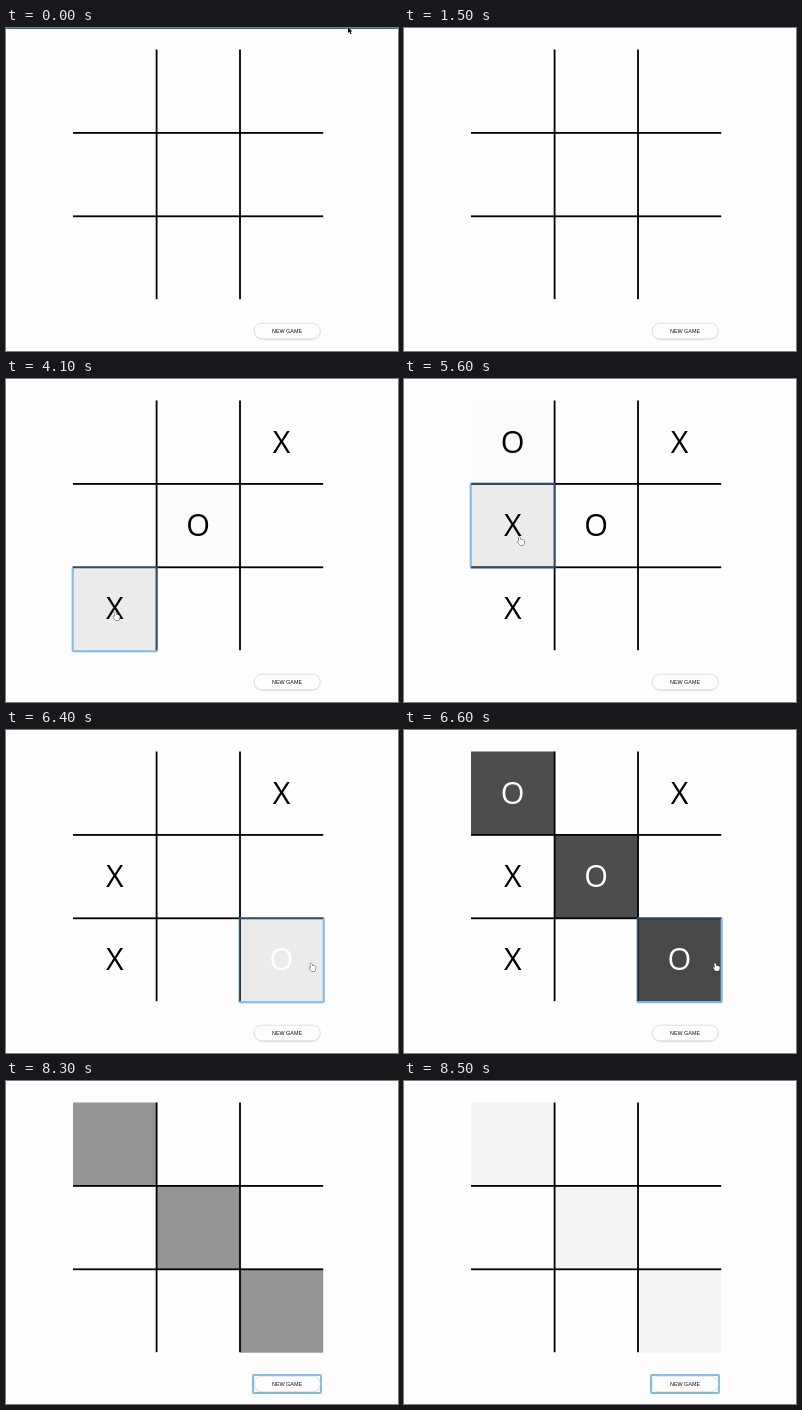
An HTML page with a canvas for the animation above (8.8 s loop, 392 by 323 pixels).

```html
<!DOCTYPE html>
<html lang="en">
<head>
<meta charset="utf-8">
<title>Tic-tac-toe</title>
<style>
html, body { margin: 0; overflow: hidden; background: #fefdff; }
canvas { display: block; }
</style>
</head>
<body>
<canvas id="stage" width="392" height="323"></canvas>
<script>
const ctx = document.getElementById('stage').getContext('2d');
const LOOP = 8800, WIN = 6400, PRESS = 7800, RESET = 8140;
const PAPER = [254, 253, 255], HOVER = [235, 235, 236];
const LEFT = 67, TOP = 21.5, CELL = 83.4;

// cell index, mark, pointer enters, click, pointer leaves
const turns = [
  [2, 'X', 2450, 2500, 3000],
  [4, 'O', 3050, 3300, 3750],
  [6, 'X', 3850, 4000, 4350],
  [0, 'O', 4550, 4600, 5250],
  [3, 'X', 5280, 5500, 6000],
  [8, 'O', 6250, WIN, 7200]
];
const winners = [0, 4, 8];

// time, x, y of the pointer's tip
const path = [
  [0, 342, -1], [100, 342, 2], [200, 342, 2], [500, 342, 15], [800, 342, 15],
  [1200, 342, 38], [1500, 342, -12], [1800, 300, -12], [2300, 290, 46],
  [2400, 290, 46], [2600, 282, 66], [2700, 282, 66], [3300, 195, 151],
  [3600, 195, 151], [4050, 109, 233], [4200, 109, 233], [4600, 110, 76],
  [5000, 110, 76], [5500, 115.5, 158], [5800, 115.5, 158], [6400, 305, 233],
  [6600, 311, 233], [6700, 311, 233], [7600, 295.5, 297], [LOOP, 295.5, 297]
];

const clamp = v => Math.max(0, Math.min(1, v));
const easeOut = v => 1 - (1 - clamp(v)) ** 2;
const mix = (a, b, k) => a.map((v, i) => v + (b[i] - v) * k);
const rgb = c => `rgb(${c.map(Math.round).join()})`;
const corner = i => [LEFT + CELL * (i % 3), TOP + CELL * Math.floor(i / 3)];

function pointerAt(t) {
  const n = path.findIndex(p => p[0] > t);
  const a = path[n - 1], b = path[n];
  const k = (t - a[0]) / (b[0] - a[0]);
  const s = k * k * (3 - 2 * k);
  return [a[1] + (b[1] - a[1]) * s, a[2] + (b[2] - a[2]) * s];
}

function text(str, x, y, font, color) {
  ctx.font = font;
  ctx.fillStyle = color;
  ctx.textAlign = 'center';
  ctx.fillText(str, x, y);
}

function ring(x, y, w, h) {
  ctx.strokeStyle = '#84bce8';
  ctx.lineWidth = 2;
  ctx.beginPath();
  ctx.roundRect(x, y, w, h, 1);
  ctx.stroke();
}

function cellColor(i, t) {
  const [, , enter, , leave] = turns.find(turn => turn[0] === i);
  const over = easeOut((t - enter) / 200) * (1 - easeOut((t - leave) / 500));
  let color = mix(PAPER, HOVER, over);
  if (winners.includes(i)) {
    color = mix(color, [0, 0, 0], easeOut((t - WIN) / 450));
    color = mix(color, PAPER, easeOut((Math.min(t, 8500) - RESET) / 450));
  }
  return rgb(color);
}

function drawBoard(t) {
  for (const [i] of turns) {
    ctx.fillStyle = cellColor(i, t);
    ctx.fillRect(...corner(i), CELL, CELL);
  }
  const active = turns.filter(turn => turn[3] <= t).pop();
  const focused = active && t < PRESS;
  if (focused) {
    const [x, y] = corner(active[0]);
    ring(x - .3, y - .3, CELL + .8, CELL + .8);
  }
  ctx.fillStyle = '#000';
  for (const k of [1, 2]) {
    ctx.fillRect(LEFT + CELL * k - .7, TOP, 1.8, CELL * 3 - .5);
    ctx.fillRect(LEFT, TOP + CELL * k - .9, CELL * 3, 1.8);
  }
  if (focused) {
    const [x, y] = corner(active[0]);
    ctx.globalAlpha = .4;
    ring(x - .3, y - .3, CELL + .8, CELL + .8);
    ctx.globalAlpha = 1;
  }
  if (t >= RESET) return;
  for (const [i, mark, , click] of turns) {
    if (t < click) continue;
    const [x, y] = corner(i);
    const light = t >= WIN && winners.includes(i);
    text(mark, x + CELL / 2, y + 52, '30.5px "Open Sans", sans-serif', light ? '#fff' : '#000');
  }
}

function drawButton(t) {
  if (t >= PRESS) ring(247, 294, 68, 18);
  ctx.save();
  ctx.shadowColor = 'rgba(0,0,0,.2)';
  ctx.shadowBlur = 1.5;
  ctx.shadowOffsetY = .6;
  ctx.fillStyle = '#fefdff';
  ctx.strokeStyle = '#d8d8da';
  ctx.lineWidth = .8;
  ctx.beginPath();
  ctx.roundRect(248.2, 295.2, 66, 15.6, 7.8);
  ctx.fill();
  ctx.restore();
  ctx.strokeStyle = '#dddde0';
  ctx.lineWidth = .8;
  ctx.stroke();
  text('NEW GAME', 281, 305, '5.4px "Liberation Sans", Arial, sans-serif', '#111');
}

function drawPointer(t) {
  if (t >= RESET) return;
  const [x, y] = pointerAt(t);
  const hand = t >= 2450 && !(y > 272 && y < 294);
  ctx.save();
  ctx.translate(x, y);
  ctx.lineJoin = 'round';
  ctx.lineWidth = .8;
  ctx.fillStyle = hand ? '#fff' : '#000';
  ctx.strokeStyle = hand ? '#111' : '#fff';
  const shape = new Path2D(hand
    ? 'M-.8 .6Q0-.6 .7 .6L1.1 2.6L4 3.2Q5 3.6 4.8 5L4 8H.4L-2 4.8Q-1.8 3.8-.3 4.8Z'
    : 'M0 0V6L1.4 4.8L2.4 7.2L3.5 6.7L2.5 4.4H4.4Z');
  ctx.stroke(shape);
  ctx.fill(shape);
  ctx.restore();
}

function draw(now) {
  const t = now % LOOP;
  ctx.fillStyle = rgb(PAPER);
  ctx.fillRect(0, 0, 392, 323);
  if (t < 1200 || (t >= 1900 && t < 2200)) {
    ctx.fillStyle = '#2f6f86';
    ctx.fillRect(0, 0, 392, 1);
  }
  drawBoard(t);
  drawButton(t);
  drawPointer(t);
  requestAnimationFrame(draw);
}
requestAnimationFrame(draw);
</script>
</body>
</html>
```
